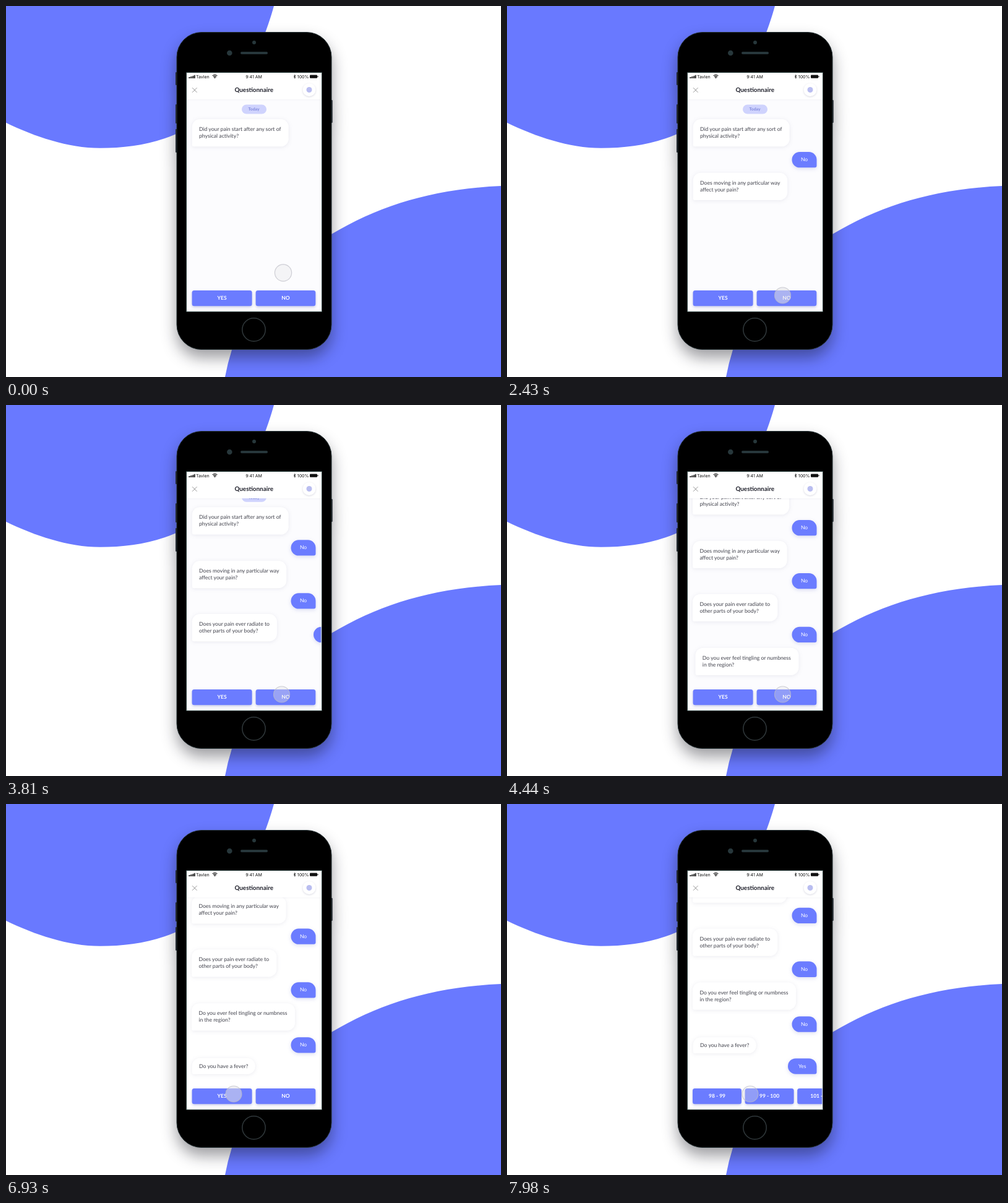
An HTML page for the animation above (8 s loop, 800 by 600 pixels).

```html
<!DOCTYPE html>
<html lang="en">
<head>
<meta charset="utf-8">
<title>Questionnaire chat</title>
<style>
  html, body { margin: 0; width: 100%; height: 100%; overflow: hidden; background: #fff; }
  svg { display: block; width: 800px; height: 600px; }
  text { font-family: Lato, sans-serif; text-rendering: geometricPrecision; }
  .status text { font: 7px Inter, sans-serif; fill: #111; }
  .mid { text-anchor: middle; }
  .bold { font-weight: 700; }
  .phone { filter: drop-shadow(0 13px 12px rgba(10, 10, 20, .4)); }
  .question { filter: drop-shadow(0 1px 3px rgba(60, 60, 110, .1)); }
  .question path { fill: #fff; }
  .question text { font-size: 8.64px; fill: #42434d; }
  .answer { filter: drop-shadow(0 2px 3px rgba(80, 90, 190, .2)); }
  .answer path, .button rect { fill: #6b7cff; }
  .answer text { font-size: 8.5px; fill: #fff; }
  .button { filter: drop-shadow(0 2px 2px rgba(50, 60, 160, .25)); }
  .button text { font-size: 8.5px; fill: #fff; }
  .header { filter: drop-shadow(0 1px 1px rgba(60, 60, 110, .05)); }
  .avatar { filter: drop-shadow(0 1px 1.5px rgba(60, 60, 110, .2)); }
</style>
</head>
<body>
<svg viewBox="0 0 800 600">
  <defs>
    <clipPath id="screen"><rect x="292" y="108" width="218" height="386"/></clipPath>
    <clipPath id="content"><rect x="292" y="108" width="217.3" height="386"/></clipPath>
  </defs>

  <rect width="800" height="600" fill="#fff"/>
  <g fill="#6979ff">
    <path d="M0 0H433C412 75 372 160 275 207C235 224 195 229.7 152 229.7C100 229.7 46 211 0 188.7Z"/>
    <path d="M800 291C690 296 605 322 526 369C440 420 385 490 365 556Q358 578 354 600H800Z"/>
  </g>

  <g class="phone">
    <g fill="#20242c">
      <rect x="274" y="107" width="4" height="21" rx="1"/>
      <rect x="274" y="159" width="4" height="31" rx="1"/>
      <rect x="274" y="199" width="4" height="38" rx="1"/>
      <rect x="523" y="152" width="4.7" height="37" rx="1"/>
    </g>
    <rect x="276" y="42.5" width="250" height="513" rx="40" stroke="#263235"/>
  </g>
  <g fill="#27373b">
    <circle cx="401" cy="59" r="3"/>
    <circle cx="361.3" cy="76" r="4.3"/>
    <rect x="379" y="74" width="44" height="4" rx="2"/>
  </g>
  <circle cx="400.5" cy="523.5" r="18.7" fill="none" stroke="#30383b" stroke-width="1.5"/>
  <rect x="291.5" y="107.5" width="219" height="387" fill="#fff" stroke="#2c403e"/>

  <g clip-path="url(#screen)">
    <rect id="backdrop" x="292" y="108" width="218" height="386"/>
    <g clip-path="url(#content)">
      <g id="chat">
        <g id="today">
          <rect x="381" y="159.5" width="40" height="15" rx="7.5" fill="#cfd3fd"/>
          <text class="mid bold" x="400.5" y="169.3" font-size="6.8" fill="#7f88dc">Today</text>
        </g>
      </g>
      <g id="choices"></g>
      <g id="ranges"></g>
    </g>
    <g class="header">
      <rect x="292" y="108" width="218" height="43" fill="#fff"/>
      <path d="M301 132.2l7.6 7.6m0-7.6l-7.6 7.6" stroke="#999" fill="none"/>
      <text class="mid bold" x="400.7" y="139.2" font-size="9.9" fill="#20212c">Questionnaire</text>
      <circle class="avatar" cx="490" cy="135.5" r="10.5" fill="#fff"/>
      <circle cx="490" cy="135.5" r="4.5" fill="#b9bdf0"/>
    </g>
    <g class="status">
      <path d="M296.2 117v-2m2.2 2v-2.7m2.2 2.7v-3.5m2.2 3.5v-4.3m2.1 4.3v-5.2" stroke="#111" stroke-width="1.5"/>
      <text x="307" y="116.9">Tavlen</text>
      <path d="M333.6 112.9q3.9-3.1 7.8 0M335 114.6q2.5-2 5 0" fill="none" stroke="#111" stroke-width="1.1"/>
      <path d="M336 115.5q1.5-1.1 3 0l-1.5 1.7z" fill="#111"/>
      <text class="mid" x="400.5" y="116.9">9:41 AM</text>
      <path d="M464.8 112.8l3.3 2.8-1.6 1.4v-5.6l1.6 1.4-3.3 2.8" fill="none" stroke="#111" stroke-width=".7"/>
      <text x="470.8" y="116.9">100%</text>
      <rect x="491" y="111.5" width="12" height="5.2" rx="1" fill="#111"/>
      <rect x="503.5" y="113" width="1" height="2.2" rx=".5" fill="#111"/>
    </g>
  </g>
  <circle id="cursor" fill="#e2e2e6" stroke="rgba(188,188,196,.7)" stroke-width="1.2"/>
</svg>

<script>
const LOOP = 8000;
const $ = id => document.getElementById(id);
const clamp = v => Math.min(1, Math.max(0, v));
const progress = (t, start, length) => clamp((t - start) / length);
const smooth = u => u * u * (3 - 2 * u);
const easeOut = (u, power) => 1 - (1 - u) ** power;
const lerp = (a, b, u) => a + (b - a) * u;

// When each answer begins to slide in; the next question follows it.
const answerAt = [1245, 2555, 3773, 5225, 7040];
const QUESTION_DELAY = 330;
const scrolls = [[3773, 50], [5225, 70.5], [7040, 33.7]];
const taps = [1120, 2430, 3650, 5100, 6915];

function add(parent, tag, attrs, content = '') {
  const el = document.createElementNS('http://www.w3.org/2000/svg', tag);
  for (const key in attrs) el.setAttribute(key, attrs[key]);
  el.textContent = content;
  return parent.appendChild(el);
}

// Rounded box with one tight bottom corner on the speaker's side.
function bubblePath(x, y, w, h, left, right) {
  const r = 12.5;
  return `M${x + r} ${y}h${w - 2 * r}a${r} ${r} 0 0 1 ${r} ${r}v${h - r - right}` +
    `a${right} ${right} 0 0 1 ${-right} ${right}h${left + right - w}` +
    `a${left} ${left} 0 0 1 ${-left} ${-left}v${left + r - h}a${r} ${r} 0 0 1 ${r} ${-r}z`;
}

function question(y, w, lines, start, nudgeAt = Infinity) {
  const el = add($('chat'), 'g', { class: 'question' });
  add(el, 'path', { d: bubblePath(300.7, 0, w, lines.length > 1 ? 44.3 : 26, 3, 12.5) });
  lines.forEach((line, i) => add(el, 'text', { x: 312, y: (lines.length > 1 ? 19.2 : 15.8) + i * 11 }, line));
  const offset = t => {
    const rest = t > nudgeAt ? -.6 : 0;
    if (t < start + 230) return lerp(-w - 16, 7, easeOut(progress(t, start, 230), 1.5));
    return lerp(7, rest, smooth(progress(t, start + 230, 230)));
  };
  return { el, y, start, offset, held: 0 };
}

function answer(y, w, label, start, held) {
  const el = add($('chat'), 'g', { class: 'answer' });
  add(el, 'path', { d: bubblePath(500.5 - w, 0, w, 25.3, 12.5, 3) });
  add(el, 'text', { x: 500.5 - w / 2, y: 15.2, class: 'mid' }, label);
  const offset = t => t < start + 190
    ? lerp(55, -10, easeOut(progress(t, start, 190), 1.5))
    : lerp(-10, 0, smooth(progress(t, start + 190, 210)));
  return { el, y, start, offset, held };
}

function button(parent, x, w, label) {
  const el = add($(parent), 'g', { class: 'button' });
  add(el, 'rect', { x, y: 460, width: w, height: 25.3, rx: 3.5 });
  add(el, 'text', { x: x + w / 2, y: 475.3, class: 'mid bold' }, label);
}

const asked = i => answerAt[i] + QUESTION_DELAY;
const items = [
  question(183, 156, ['Did your pain start after any sort of', 'physical activity?'], -2000, 4050),
  answer(236, 40, 'No', answerAt[0], 0),
  question(269.7, 152.5, ['Does moving in any particular way', 'affect your pain?'], asked(0), 4050),
  answer(322, 40, 'No', answerAt[1], 0),
  question(355.7, 137.3, ['Does your pain ever radiate to', 'other parts of your body?'], asked(1), 4050),
  answer(408.8, 40, 'No', answerAt[2], 50),
  question(442.7, 167, ['Do you ever feel tingling or numbness', 'in the region?'], asked(2), 5600),
  answer(497.7, 40, 'No', answerAt[3], 120.5),
  question(531.5, 102, ['Do you have a fever?'], asked(3)),
  answer(565.6, 46.5, 'Yes', answerAt[4], 154.2)
];

button('choices', 300.6, 97, 'YES');
button('choices', 403.6, 96.7, 'NO');
['98 - 99', '99 - 100', '101 - 102'].forEach((label, i) => button('ranges', 300 + i * 84.6, 79, label));

// Cursor moves: start, length, x, y, radius.
const moves = [
  [540, 460, 445.5, 468, 13],
  [6050, 640, 368, 469, 13],
  [7450, 480, 393, 469, 13]
];

function drawCursor(t) {
  let spot = [448, 431.5, 13.6];
  for (const [start, length, ...to] of moves) {
    const u = smooth(progress(t, start, length));
    spot = spot.map((v, i) => lerp(v, to[i], u));
  }
  // A press makes the cursor denser at once, then it clears again.
  const press = Math.max(...taps.map(at => t < at ? 0 : 1 - smooth(progress(t, at, 250))));
  ['cx', 'cy', 'r'].forEach((name, i) => $('cursor').setAttribute(name, spot[i]));
  $('cursor').setAttribute('fill-opacity', lerp(.32, .54, press));
}

function draw(t) {
  const scroll = scrolls.reduce((sum, [start, by]) => sum + by * easeOut(progress(t, start, 280), 3), 0);
  $('today').setAttribute('transform', `translate(0 ${-scroll})`);
  for (const { el, y, start, offset, held } of items) {
    el.setAttribute('visibility', t >= start ? 'visible' : 'hidden');
    el.setAttribute('transform', `translate(${offset(t)} ${y - Math.max(scroll, held)})`);
  }
  const out = progress(t, 7050, 250) ** 2;
  const back = easeOut(progress(t, 7330, 400), 3);
  $('choices').setAttribute('transform', `translate(0 ${40 * out})`);
  $('ranges').setAttribute('transform', `translate(0 ${40 * (1 - back)})`);
  $('backdrop').setAttribute('fill', t < 5100 ? '#fcfcfe' : '#fff');
  drawCursor(t);
}

const begin = performance.now();
function tick() {
  draw((performance.now() - begin) % LOOP);
  requestAnimationFrame(tick);
}
tick();
</script>
</body>
</html>
```
